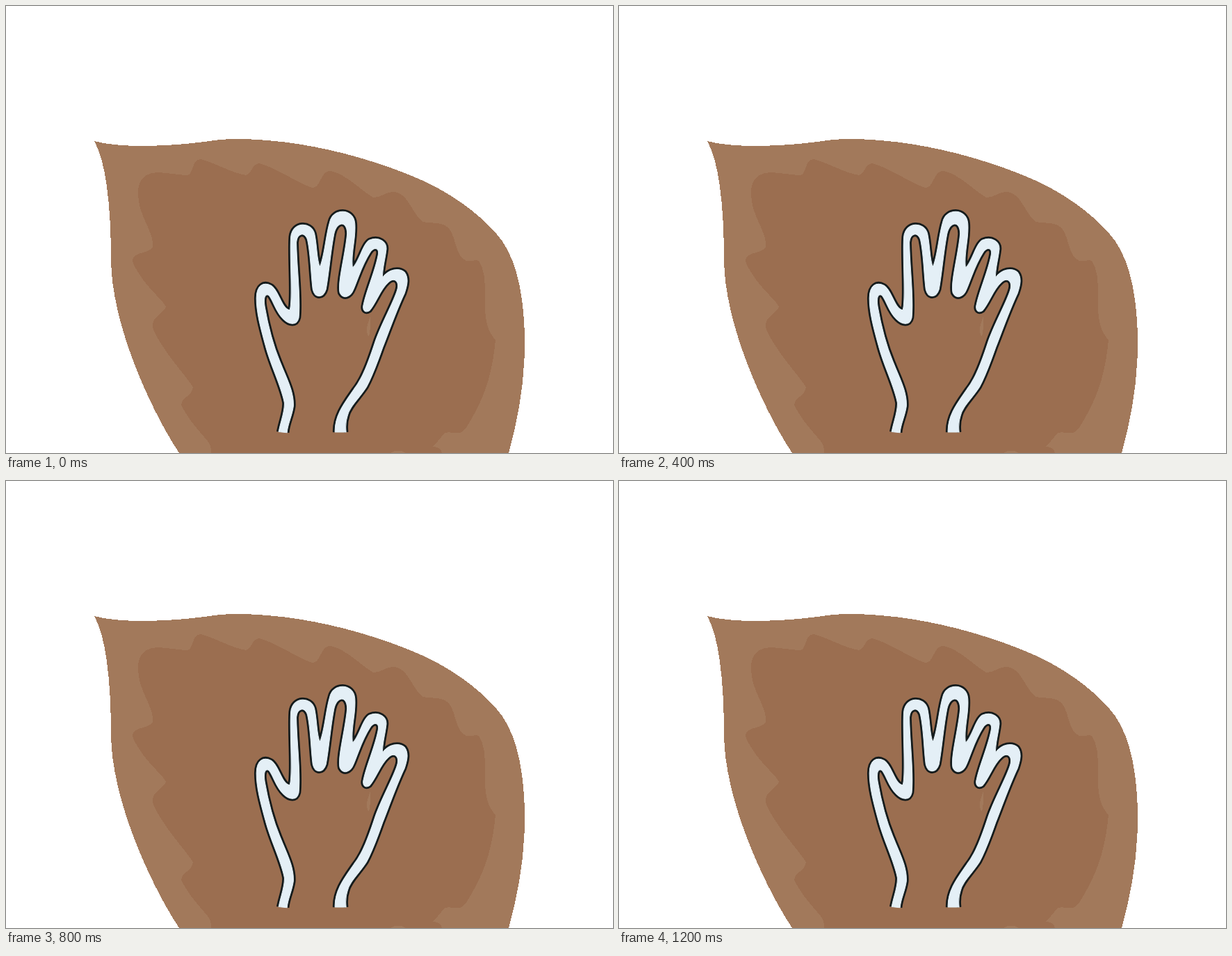
Animation, 873 px wide and 642 px high, one loop 2.2 s. Source, as an HTML page:

```html
<!DOCTYPE html>
<html lang="en">
<head>
<meta charset="utf-8">
<title>Waving hand</title>
<style>
  html, body { margin: 0; width: 100%; height: 100%; overflow: hidden; background: #fff; }
  svg { display: block; width: 100%; height: 100%; }
</style>
</head>
<body>
<svg viewBox="0 0 873 642">
  <g shape-rendering="crispEdges">
    <path fill="#a2795b" d="M127 194C165 205 240 201 285 195C300 193 312 191 330 191C430 191 530 220 600 251
      C650 274 692 308 714 338C737 372 746 425 746 485C746 540 737 590 723 642H249C205 575 152 455 151 365
      C151 300 146 228 127 194Z"/>
    <path fill="#9b6e50" d="M190 270C189 250 200 239 218 239C238 240 249 243 261 243C270 241 267 220 280 220
      C300 225 325 240 345 243C355 240 353 226 365 226C390 233 415 252 440 261C454 261 451 237 467 237
      C488 241 507 262 528 275C543 274 545 267 559 267C580 270 584 300 600 310C614 313 625 309 637 319
      C648 334 646 359 662 366C670 367 674 364 680 366C690 382 689 400 689 430C689 455 694 468 704 480
      C699 535 685 569 661 607C651 619 643 610 632 613C625 619 620 627 614 633Q625 633 627 642H295
      Q296 629 285 619C270 602 259 588 252 573C252 562 268 560 269 548C262 534 228 500 212 465
      C206 448 226 442 230 432C226 422 198 402 183 370C177 353 202 357 211 347C214 325 190 302 190 270Z"/>
    <path fill="#a2795b" d="M524 446Q525 460 522 475Q515 467 524 446ZM553 642Q564 635 575 642Z"/>
  </g>
  <g id="hand" stroke-linejoin="round">
    <path id="edges" fill="none" stroke="#141b1c" stroke-width="6.5"/>
    <path id="band" fill="#e4eff6" stroke="#e4eff6"/>
  </g>
</svg>
<script>
const $ = id => document.getElementById(id);

const outer = `393 612C396 596 402 582 401 570C396 545 380 515 373 487C366 462 360 440 360 420
  C360 402 370 396 381 402C392 408 397 437 408 437C413 424 407 360 409 332C411 310 438 309 443 327
  C447 345 446 363 451 375C458 358 459 330 465 310C469 290 499 290 501 312C503 335 495 354 498 376
  C508 366 512 342 522 336C535 330 549 338 546 352C545 362 541 376 541 390C550 377 565 375 573 382
  C579 390 577 400 573 412C560 440 550 470 542 490C534 513 527 532 519 547C508 564 495 575 492 588
  C489 597 489 604 490 612`;
const inner = `474 612C473 588 488 569 501 550C513 535 522 510 531 482C540 455 560 420 563 405
  C565 393 557 389 549 397C538 407 533 425 523 437C517 441 512 437 514 429C518 408 531 380 535 356
  C536 346 528 346 523 354C511 373 506 392 500 406C495 419 485 421 480 412C476 398 488 355 490 327
  C490 308 475 308 471 328C466 355 464 385 460 407C456 420 444 420 441 407C438 385 438 358 433 336
  C429 324 418 326 417 340C418 380 424 420 421 448C418 460 407 458 399 450C388 440 385 425 378 416
  C372 413 370 420 372 432C377 460 385 490 396 515C404 535 415 555 414 575C412 590 406 600 405 613`;

// The wrist ends stay open: only the long edges are inked, behind the pale band.
$('band').setAttribute('d', `M${outer}L${inner}Z`);
$('edges').setAttribute('d', `M${outer}M${inner}`);

const LOOP = 2200, STEP = 100, TILT = 7.8, REST = 0.3;

// Triangle wave over eight steps: 0, -1, -2, -1, 0, 1, 2, 1
const swing = n => Math.abs((n + 2) % 8 - 4) - 2;

function draw(time) {
  const step = Math.min(12, Math.floor(time % LOOP / STEP));
  $('hand').setAttribute('transform', `rotate(${REST + swing(step) * TILT} 468 453)`);
}

const start = performance.now();
function tick() {
  draw(performance.now() - start);
  requestAnimationFrame(tick);
}
tick();
</script>
</body>
</html>
```
